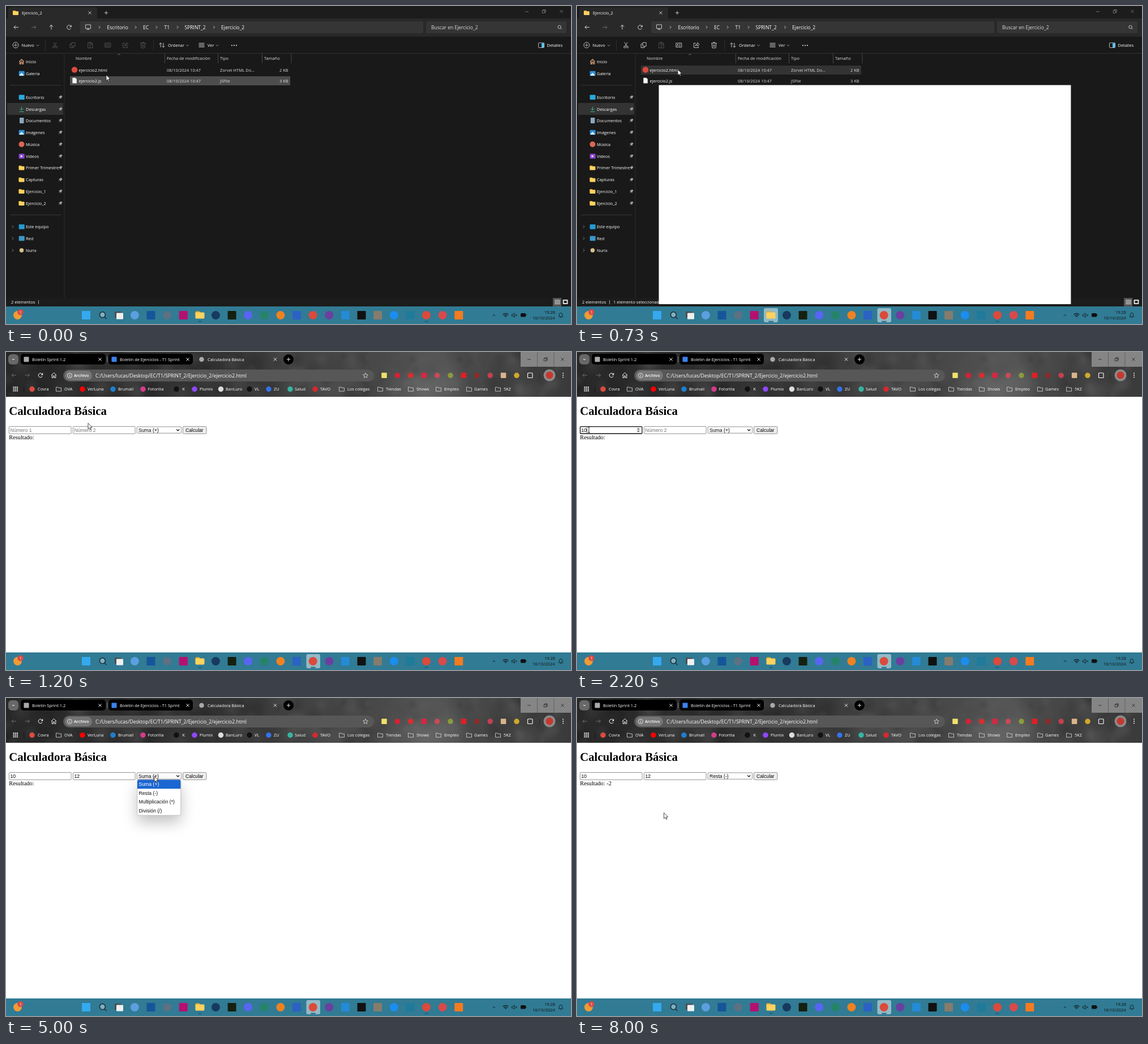
Write an HTML page with a canvas that moves like this. It is 998 px wide and 561 px high and loops after 8.27 s.

```html
<!DOCTYPE html>
<html lang="es">
<head>
<meta charset="utf-8">
<title>Calculadora Básica</title>
<style>
html, body { margin: 0; width: 100%; height: 100%; overflow: hidden; background: #191919 }
canvas { display: block }
</style>
</head>
<body>
<canvas id="stage" width="998" height="561"></canvas>
<script>
const ctx = document.getElementById('stage').getContext('2d');
const LOOP = 8270, FPS = 15;
const UI = '"Open Sans", "Noto Sans", sans-serif';
const ARIAL = '"Liberation Sans", Arial, sans-serif';
const SERIF = '"Liberation Serif", "Times New Roman", serif';

// ---- drawing helpers ----
function text(s, x, y, color = '#fff', size = 7.4, family = UI, weight = '') {
  ctx.font = `${weight} ${size}px ${family}`;
  ctx.fillStyle = color;
  ctx.fillText(s, x, y);
}
function box(x, y, w, h, fill, r = 0, stroke, lw = 0.7) {
  ctx.beginPath();
  ctx.roundRect(x, y, w, h, r);
  if (fill) { ctx.fillStyle = fill; ctx.fill(); }
  if (stroke) { ctx.strokeStyle = stroke; ctx.lineWidth = lw; ctx.stroke(); }
}
const square = (x, y, s, color, r = 1) => box(x - s / 2, y - s / 2, s, s, color, r);
const dot = (x, y, d, color) => square(x, y, d, color, d / 2);
function icon(path, x, y, color = '#e8e8e8', lw = 0.8, fill) {
  const p = new Path2D(path);
  ctx.save();
  ctx.translate(x, y);
  if (fill) { ctx.fillStyle = fill; ctx.fill(p); }
  ctx.strokeStyle = color;
  ctx.lineWidth = lw;
  ctx.stroke(p);
  ctx.restore();
}
function folder(x, y, s = 1) {
  box(x - 5 * s, y - 4 * s, 5 * s, 4 * s, '#e8a92c', s);
  box(x - 5 * s, y - 2.8 * s, 10 * s, 6.8 * s, '#ffd25e', s);
}

const P = {
  close: 'M-2.6-2.6L2.6 2.6M2.6-2.6L-2.6 2.6',
  plus: 'M-3.2 0H3.2M0-3.2V3.2',
  min: 'M-3 0H3',
  max: 'M-2.8-1.5H1.6V2.9H-2.8ZM-1.2-1.5V-3H3.2V1.4H1.6',
  back: 'M4 0H-4M-.8-3.2L-4 0L-.8 3.2',
  fwd: 'M-4 0H4M.8-3.2L4 0L.8 3.2',
  up: 'M0 4V-4M-3.2-.8L0-4L3.2-.8',
  reload: 'M3.6-.5A3.7 3.7 0 1 0 3.2 1.8M3.7-3.8V-.8H.8',
  down: 'M-2-1L0 1L2-1',
  right: 'M-1.2-2.4L1.2 0L-1.2 2.4',
  caretUp: 'M-2 1L0-1L2 1',
  search: 'M1.5 1.5L3.6 3.6M2.2-.5A2.7 2.7 0 1 1-3.2-.5A2.7 2.7 0 1 1 2.2-.5',
  bigSearch: 'M3 3L6.5 6.5M4.4-.8A5 5 0 1 1-5.6-.8A5 5 0 1 1 4.4-.8',
  monitor: 'M-4.5-4H4.5V2.6H-4.5ZM-2.5 4.4H2.5M0 2.6V4.4',
  cut: 'M-2.6-5L1.6 2M2.6-5L-1.6 2M-.8 3.4A1.6 1.6 0 1 1-4 3.4A1.6 1.6 0 1 1-.8 3.4M4 3.4A1.6 1.6 0 1 1 .8 3.4A1.6 1.6 0 1 1 4 3.4',
  copy: 'M-1.5-4.5H4.5V2H-1.5ZM-1.5-2H-4.5V4.5H1.5V2',
  paste: 'M-1-3.8H-4V5H-.5M-1.5-5H1.5V-3H-1.5ZM1.5-3.8H4V-1M0-.8H4.5V5H0Z',
  rename: 'M1-3.5H-5V3.5H1M3.2-3.5H5V3.5H3.2M2-5V5M-3.4 2L-1.8-2L-.2 2',
  share: 'M-1-3.5H-4.5V4.5H3.5V2M-2 1.5Q-1.5-2 2-2V-4.6L5-1.2L2 1.8V0Q-.5-.2-2 1.5',
  trash: 'M-5-3.3H5M-3.8-3.3L-3 5H3L3.8-3.3M-1.4-3.5V-5H1.4V-3.5M-1-1V3M1-1V3',
  sort: 'M-2.5 4V-4M-5-1.5L-2.5-4L0-1.5M2.5-4V4M0 1.5L2.5 4L5 1.5',
  lines: 'M-5-3.3H5M-5-1.1H5M-5 1.1H5M-5 3.3H5',
  house: 'M-4.5 0L0-4.5L4.5 0M-3.3-1V4.5H-1V1H1V4.5H3.3V-1',
  pin: 'M-3 3L-.8.8M-2.5-1L1 2.5L1.4.8L3.3-1.2L1.2-3.3L-.8-1.4Z',
  star: 'M0-4.4L1.2-1.4L4.4-1.2L2 .9L2.7 4L0 2.3L-2.7 4L-2 .9L-4.4-1.2L-1.2-1.4Z',
  folder: 'M-4.5-3.5H-1L0-2.3H4.5V3.7H-4.5Z',
  wifi: 'M-5-1.2Q0-5.4 5-1.2M-3.2.8Q0-2 3.2.8M-1.4 2.6Q0 1.3 1.4 2.6',
  sound: 'M-4.5-1.5H-2.5L0-3.7V3.7L-2.5 1.5H-4.5ZM1.8-1.5L4.8 1.5M4.8-1.5L1.8 1.5',
  bell: 'M-3.8 2.5H3.8L2.7 1V-1.2A2.7 2.7 0 0 0-2.7-1.2V1ZM-1 4H1',
  arrow: 'M0 0V10.2L2.4 8L4 11.6L5.6 10.9L4 7.4H7.2Z',
  beam: 'M-2-5H2M0-5V5M-2 5H2'
};

// ---- file explorer ----
const SIDEBAR = [
  ['Inicio', 98, 'house'], ['Galería', 119, '#2d8fd8'],
  ['Escritorio', 161, '#29a8dc', 1], ['Descargas', 182, 'down', 1], ['Documentos', 202, '#8ba6bd', 1],
  ['Imágenes', 223, '#2d8fd8', 1], ['Música', 244, '#dc6654', 1], ['Vídeos', 265, '#8c45d6', 1],
  ['Primer Trimestre', 285.5, 'folder', 1], ['Capturas', 306.5, 'folder', 1],
  ['Ejercicio_1', 327, 'folder', 1], ['Ejercicio_2', 348, 'folder', 1],
  ['Este equipo', 389.5, '#249bd3', 0, 1], ['Red', 410, '#3997c9', 0, 1], ['Nurix', 431, '#d6c08a', 0, 1]
];

function drawSidebar() {
  box(2, 171, 99, 21, '#333', 1);
  box(7, 139.5, 90, 0.7, '#444');
  box(7, 368, 90, 0.7, '#444');
  box(102.5, 83, 1, 432, '#2c2c2c');
  for (const [label, y, kind, pinned, expands] of SIDEBAR) {
    if (kind === 'house') icon(P.house, 27.5, y, '#d9a27c', 1, '#8d6250');
    else if (kind === 'folder') folder(27.5, y);
    else if (kind === 'down') icon('M0-4.5V2M-3-1L0 2L3-1M-4 4.5H4', 27.5, y, '#35b497', 1);
    else if (label === 'Música') dot(27.5, y, 10, kind);
    else if (label === 'Nurix') dot(27.5, y, 7.5, kind);
    else if (label === 'Documentos') box(24, y - 5, 7.5, 10, kind, 1);
    else {
      box(22.7, y - 4.3, 10, 8.6, kind, 1);
      if (kind === '#2d8fd8') icon('M-4 3.5L0-1L4 3.5Z', 27.5, y, '#fff', 0.3, '#fff');
      if (label === 'Vídeos') icon('M-1.5-2L2 0L-1.5 2Z', 27.5, y, '#fff', 0.3, '#fff');
    }
    text(label, 35, y + 2.7);
    if (pinned) icon(P.pin, 96, y, '#a5a5a5', 0.6, '#a5a5a5');
    if (expands) icon(P.right, 12, y, '#999');
  }
}

function drawExplorer(now) {
  const selected = now >= 465;
  box(0, 0, 998, 530, '#191919');
  box(0, 0, 998, 23, '#1c1c1c');
  box(4, 2, 157, 24, '#292929', 4);
  box(0, 22, 998, 32, '#292929');
  folder(17, 12);
  text('Ejercicio_2', 28, 14.7);
  icon(P.close, 148, 12);
  icon(P.plus, 177, 12);
  icon(P.min, 920, 10, '#888');
  icon(P.max, 950, 9.5, '#888');
  icon(P.close, 981, 9.5, '#888', 0.7);

  icon(P.back, 18, 37.5, '#fff');
  icon(P.fwd, 49, 37.5, '#777');
  icon(P.up, 80, 37.5, '#fff');
  icon(P.reload, 111.5, 37.5, '#fff');
  box(131, 27, 606, 21, '#353535', 2);
  box(742, 27, 248, 21, '#353535', 2);
  icon(P.monitor, 145, 37);
  for (const x of [165, 229, 266, 303, 367.5]) icon(P.right, x, 37.5);
  [['Escritorio', 178.5], ['EC', 242], ['T1', 279.5], ['SPRINT_2', 315.5], ['Ejercicio_2', 380]]
    .forEach(([s, x]) => text(s, x, 40.6, '#fff', 8.5));
  text('Buscar en Ejercicio_2', 751, 40.6, '#ddd', 8.5);
  icon(P.search, 978, 37.5);

  icon(P.plus, 17, 69, '#ddd', 0.7);
  box(12, 64, 10, 10, null, 5, '#ddd', 0.8);
  text('Nuevo', 27.5, 71.8);
  icon(P.down, 56, 69.5, '#bbb');
  box(69, 60, 0.7, 19, '#3a3a3a');
  ['cut', 'copy', 'paste', 'rename', 'share', 'trash'].forEach((name, i) =>
    icon(P[name], 86.5 + i * 31.1, 69, selected && name !== 'paste' ? '#e5e5e5' : '#5d5d5d'));
  box(260, 60, 0.7, 19, '#3a3a3a');
  icon(P.sort, 275.5, 69);
  text('Ordenar', 286, 71.8);
  icon(P.down, 320.5, 69.5, '#bbb');
  icon(P.lines, 345.5, 69);
  text('Ver', 356, 71.8);
  icon(P.down, 373, 69.5, '#bbb');
  for (const x of [399, 403, 407]) dot(x, 69.5, 1.9, '#fff');
  box(940.5, 65, 10, 8.5, null, 1, '#ddd', 0.8);
  box(946, 65.5, 4, 7.5, '#4cc2ff');
  text('Detalles', 955.5, 71.8);
  box(0, 83, 998, 0.7, '#3a3a3a');

  drawSidebar();

  [['Nombre', 123], ['Fecha de modificación', 284], ['Tipo', 378], ['Tamaño', 456]]
    .forEach(([s, x]) => text(s, x, 94.8, '#ddd'));
  for (const x of [280, 374, 452, 503.5]) box(x, 84, 0.8, 17, '#555');
  icon(P.caretUp, 199.5, 85.5, '#aaa', 0.7);

  if (now < 65) box(113, 124, 389, 16, '#4d4d4d');
  else box(113, 105, 389, 16, selected ? '#333' : '#4d4d4d');
  dot(121, 112.5, 10.5, '#db4a3b');
  icon('M-3.6-4.7H1.5L3.8-2.4V4.7H-3.6Z', 121, 131.5, '#bbb', 0.4, '#f4f4f4');
  [['ejercicio2.html', 'Zorvel HTML Do...', '2 KB'], ['ejercicio2.js', 'JSFile', '3 KB']]
    .forEach(([name, type, size], i) => {
      const y = 115.7 + 19.2 * i;
      text(name, 128.5, y);
      text('08/10/2024 10:47', 284, y, '#ddd');
      text(type, 378, y, '#ddd');
      text(size, 483, y, '#ddd');
    });

  box(0, 515, 998, 15, '#1c1c1c');
  text('2 elementos', 9, 525);
  box(57, 519, 0.8, 7, '#ccc');
  if (selected) {
    text('1 elemento seleccionado  1,05 KB', 64, 525);
    box(187, 519, 0.8, 7, '#ccc');
  }
  box(966, 515, 15, 15, '#555');
  icon(P.lines, 974, 522.3, '#fff', 0.8);
  box(983.5, 518, 9, 8, '#ddd', 1);
  box(985.5, 520, 5, 4, '#222');
}

// ---- browser ----
const EXTENSIONS = ['#efe06a', '#d92035', '#e02a2a', '#d52743', '#c94a58', '#8a9a3c',
  '#e01f26', '#8f2a2a', '#c5404f', '#d9b48b', '#d0a82a'];
const BOOKMARKS = [
  ['Covra', 46, 56, '#dd4b3e'], ['OVA', 93, 103], ['VerLuna', 135, 144, '#f00'], ['Brumail', 189, 198, '#1d7fd0'],
  ['Fotorilia', 242, 250.5, '#d63a8a'], ['K', 301, 311.5, '#111'], ['Plumix', 333, 342, '#9146ff'],
  ['BanLuro', 379.5, 388, '#ddd'], ['VL', 430, 439, '#111'], ['ZU', 464, 473, '#3572e8'],
  ['Salud', 502, 510, '#36b6a0'], ['TAVO', 546, 555, '#d9272e'], ['Los colegas', 593, 603],
  ['Tiendas', 661, 671], ['Shows', 715, 725], ['Empleo', 764, 774], ['Games', 818, 827], ['5KZ', 869, 879]
];

// Soft mottled grey behind the tabs, painted once.
const HEADER = 78.6;
const backdrop = (() => {
  const canvas = Object.assign(document.createElement('canvas'), { width: 998, height: 79 });
  const c = canvas.getContext('2d');
  const base = c.createLinearGradient(0, 0, 998, 0);
  [[0, '#282828'], [0.35, '#333'], [0.55, '#434343'], [0.76, '#4e4e4e'], [1, '#3a3a3a']]
    .forEach(([at, color]) => base.addColorStop(at, color));
  c.fillStyle = base;
  c.fillRect(0, 0, 998, 79);
  const blob = (x, y, r, shade, alpha) => {
    const g = c.createRadialGradient(x, y, 0, x, y, r);
    g.addColorStop(0, `rgba(${shade},${shade},${shade},${alpha})`);
    g.addColorStop(1, `rgba(${shade},${shade},${shade},0)`);
    c.fillStyle = g;
    c.fillRect(x - r, y - r, 2 * r, 2 * r);
  };
  let seed = 7;
  const random = () => (seed = seed * 16807 % 2147483647) / 2147483647;
  for (let i = 0; i < 160; i++)
    blob(random() * 998, random() * 79, 8 + random() * 22, i % 2 ? 120 : 15, 0.14);
  blob(745, 62, 90, 150, 0.3);
  return canvas;
})();

function drawBrowserFrame() {
  ctx.drawImage(backdrop, 0, 0, 998, HEADER);

  box(4, 4, 18, 18, '#686868', 6);
  icon(P.down, 13, 13, '#fff', 1);
  box(26, 3, 150, 19, '#000', 5);
  box(181, 3, 149, 19, '#000', 5);
  box(178.5, 8, 0.8, 10, '#999');
  square(36, 13, 9, '#aaa');
  square(191, 13, 9, '#3b82ee');
  dot(345.5, 13, 8.5, '#aaa');
  text('Boletín Sprint 1.2', 46, 15.7);
  ctx.save();
  ctx.beginPath();
  ctx.rect(200, 0, 108, 25);
  ctx.clip();
  text('Boletín de Ejercicios - T1 Sprint', 201, 15.7);
  ctx.restore();
  text('Calculadora Básica', 356, 15.7);
  for (const x of [166, 321, 475.5]) icon(P.close, x, 13, '#fff', 0.9);
  dot(499, 13, 18, '#000');
  icon(P.plus, 499, 13, '#fff', 0.9);
  box(909, 0, 89, 26, '#858585');
  for (const x of [938, 967.5]) box(x, 0, 0.8, 26, '#5a5a5a');
  icon(P.min, 924, 13, '#222');
  icon(P.max, 953, 13, '#222');
  icon(P.close, 983, 13, '#222');

  icon(P.back, 14, 41, '#777', 0.9);
  icon(P.fwd, 37.5, 41, '#777', 0.9);
  icon(P.reload, 61, 41, '#fff', 1);
  icon(P.house, 84.5, 41, '#fff', 0.9);
  box(101, 31, 549, 21, '#575757', 10.5);
  box(104, 33, 48, 17, '#767676', 8.5);
  box(108.5, 37.5, 8, 8, null, 4, '#fff', 0.8);
  icon('M0-2V-1.2M0-.3V2.2', 112.5, 41.3, '#fff', 0.9);
  text('Archivo', 120, 43.8, '#fff', 7.3, UI, 600);
  text('C:/Users/lucas/Desktop/EC/T1/SPRINT_2/Ejercicio_2/ejercicio2.html', 158, 44.5, '#fff', 8.6);
  icon(P.star, 635, 41.3, '#ddd');
  EXTENSIONS.forEach((color, i) => (i % 3 ? dot : square)(668 + i * 23.4, 41.3, 9.5, color));
  box(921.5, 37, 8.5, 8.5, null, 1, '#fff', 1.1);
  box(942, 36, 0.8, 11, '#222');
  dot(960, 41, 21, '#8a8a8a');
  dot(960, 41, 13, '#c8372f');
  for (const y of [37.5, 41, 44.5]) dot(984, y, 1.8, '#fff');

  for (let i = 0; i < 9; i++)
    box(12.5 + (i % 3) * 3.2, 61 + Math.floor(i / 3) * 3.2, 2.2, 2.2, '#ddd');
  box(31.5, 60, 0.8, 11, '#111');
  for (const [label, x, tx, color] of BOOKMARKS) {
    if (color) dot(x, 65.5, 9.5, color);
    else icon(P.folder, x, 65.5, '#ddd');
    text(label, tx, 68.2);
  }
}

function field(x, y, w, h, ring) {
  if (ring) box(x + 0.2, y + 0.2, w - 0.4, h - 0.4, '#fff', 1.2, '#101010', 1.3);
  else box(x, y, w, h, '#fff', 1, '#767676', 0.8);
}

function drawInput(x, value, hint, focused, hovered) {
  field(x + 0.4, 131.4, 109.7, 12.8, focused);
  text(value || hint, x + 2.5, 140.6, value ? '#000' : '#757575', 8.66, ARIAL);
  if (focused) box(x + 2.6 + value.length * 4.8, 133, 0.7, 9.5, '#000');
  if (focused || hovered) {
    box(x + 100, 133, 6.5, 9.5, '#eee');
    icon('M-2-1.2L0-3.2L2-1.2ZM-2 1.2L0 3.2L2 1.2Z', x + 103.3, 137.8, '#444', 0.2, '#444');
  }
}

function drawMenu(now) {
  ctx.save();
  ctx.globalAlpha = Math.max(0, Math.min(1, (now - 4535) / 190, (5670 - now) / 200));
  ctx.shadowColor = 'rgba(0,0,0,.25)';
  ctx.shadowBlur = 26;
  ctx.shadowOffsetY = 12;
  box(232, 144, 76.5, 63, '#fff', 3);
  ctx.shadowColor = 'transparent';
  box(231.8, 144, 77, 63, null, 3, '#aaa', 0.6);
  const active = now < 5125 ? 0 : 1;
  box(232, 144.3 + active * 15.6, 76.5, 15.6, '#1b66d0', active ? 0 : [3, 3, 0, 0]);
  ['Suma (+)', 'Resta (-)', 'Multiplicación (*)', 'División (/)'].forEach((s, i) =>
    text(s, 234.5, 154.9 + i * 15.6, i === active ? '#fff' : '#111', 8.66, ARIAL));
  ctx.restore();
}

function drawPage(now, [cx, cy]) {
  box(0, 78, 998, 452, '#fff');
  text('Calculadora Básica', 5.2, 111.3, '#000', 20.8, SERIF, 'bold');
  const inRow = cy > 131 && cy < 144.5;
  const typed = (s, at) => now < at ? '' : now < at + 65 ? s[0] : s;
  drawInput(5, typed('10', 2130), 'Número 1', now >= 1725 && now < 3395, inRow && cx < 115.5);
  drawInput(118, typed('12', 3865), 'Número 2', now >= 3395 && now < 4595, inRow && cx > 118 && cx < 228);
  const chosen = now >= 5465;
  field(231.2, 131.9, 78.4, 11.3, chosen && now < 6065);
  text(chosen ? 'Resta (-)' : 'Suma (+)', 234, 140.6, '#000', 8.66, ARIAL);
  icon('M-2.5-1.3L0 1.3L2.5-1.3', 303.7, 137.7, '#000', 1.2);
  const hot = inRow && cx > 312;
  box(312.4, 131.4, 41.5, 12.8, hot ? '#e5e5e5' : '#efefef', 1.5, hot ? '#4f4f4f' : '#767676', 0.8);
  text('Calcular', 317, 140.6, '#000', 8.66, ARIAL);
  text(now >= 6065 ? 'Resultado: -2' : 'Resultado:', 5.2, 153.9, '#000', 10.4, SERIF);
  if (now > 4590 && now < 5670) drawMenu(now);
}

// ---- taskbar ----
const APPS = [['#35a9ef', 1], 0, 0, ['#5b9fe0'], ['#15559a', 1], ['#5d7183'], ['#b5106f', 1], 0, ['#173a5e'],
  ['#16200f', 1], ['#5865f2'], ['#258468'], ['#ee8222'], ['#2b62c4', 1], ['#db4a3b'], ['#6b3fa0'],
  ['#248bd5', 1], ['#111', 1], ['#857c6c', 1], ['#1b8df0'], ['#1f7a9c', 1], ['#db4a3b'], ['#d84a4a'], ['#f47b20', 1]];

function drawTaskbar(now) {
  box(0, 530, 998, 31, '#317b94');
  dot(20.5, 545.5, 15, '#f09b35');
  dot(25.5, 540, 10.5, '#d84a45');
  text('1', 23.8, 542.6, '#fff', 7);
  const browserOpen = now >= 665, explorerActive = now >= 65 && now < 990;
  const glow = 'rgba(255,255,255,.48)';
  if (explorerActive) box(330, 533, 25, 25, glow, 3);
  if (browserOpen) box(530.5, 533, 24.5, 25, glow, 3);
  APPS.forEach((app, i) => {
    const x = 141.5 + i * 28.62;
    if (app) (app[1] ? square : dot)(x, 545.5, 15, app[0]);
  });
  icon(P.bigSearch, 171, 545.5, '#1d333d', 1.7, '#7fb0c2');
  box(192, 539, 11.5, 11, '#4b4f52', 1);
  box(195, 541.5, 12, 11, '#f0f0f0', 1);
  folder(342.5, 545, 1.6);
  const bar = (x, w) => box(x - w / 2, 555.7, w, 1.7, '#1d5c77', 0.8);
  bar(342.5, explorerActive ? 9 : 6);
  if (browserOpen) bar(542.5, 9);
  bar(742.5, 6);

  icon(P.caretUp, 862, 545.5, '#111', 1);
  icon(P.wifi, 882.5, 545.5, '#111', 1.1);
  icon(P.sound, 898, 545.5, '#111');
  box(909, 542, 9, 6.5, '#111', 1.5);
  box(918.2, 544, 1, 2.5, '#111');
  text('19:28', 951, 542.8, '#111', 7.4);
  text('16/10/2024', 930, 553, '#111', 7.45);
  icon(P.bell, 980, 545.5, '#111');
}

// ---- pointer path: time, x, y ----
const POINTER = [
  [0, 177, 121.5], [133, 178, 112], [800, 178, 112], [1200, 145, 125.5], [1333, 124, 132], [1733, 21, 137],
  [2667, 21, 137], [2900, 62, 160], [3133, 192, 147], [3267, 193, 146], [3400, 195.5, 141],
  [4000, 195.5, 141], [4400, 262, 138], [5067, 262, 138], [5200, 262, 164], [5533, 262, 164],
  [5933, 329.5, 141], [6200, 329.5, 141], [6600, 205, 164], [6867, 76, 178], [7067, 62, 167],
  [7333, 88, 186], [7667, 153.5, 202.5], [LOOP, 153.5, 202.5]
];
function pointerAt(now) {
  const i = Math.max(1, POINTER.findIndex(key => key[0] >= now));
  const [t0, x0, y0] = POINTER[i - 1], [t1, x1, y1] = POINTER[i];
  const k = (now - t0) / (t1 - t0);
  return [x0 + (x1 - x0) * k, y0 + (y1 - y0) * k];
}
function drawPointer([x, y], inBrowser) {
  const overField = y > 131 && y < 145 && ((x > 5 && x < 115.5) || (x > 118 && x < 228));
  if (inBrowser && overField) icon(P.beam, x, y, '#111', 0.9);
  else icon(P.arrow, x, y, '#000', 0.7, '#fff');
}

function drawOpening(now) {
  const k = Math.min(1, Math.max(0, (now - 733) / 200));
  const ease = 1 - (1 - k) ** 2;
  ctx.globalAlpha = now < 730 ? 0.5 : 1;
  box(145 * (1 - ease), 140 * (1 - ease), 727 + 271 * ease, 386 + 144 * ease, '#fff');
  ctx.globalAlpha = 1;
}

function render() {
  const elapsed = performance.now() % LOOP;
  const now = Math.floor((elapsed + 4) * FPS / 1000) * 1000 / FPS;
  const pointer = pointerAt(now), inBrowser = now >= 990;
  if (inBrowser) {
    drawPage(now, pointer);
    drawBrowserFrame();
  } else {
    drawExplorer(now);
    if (now >= 665) drawOpening(now);
  }
  drawTaskbar(now);
  drawPointer(pointer, inBrowser);
  requestAnimationFrame(render);
}
render();
</script>
</body>
</html>
```
